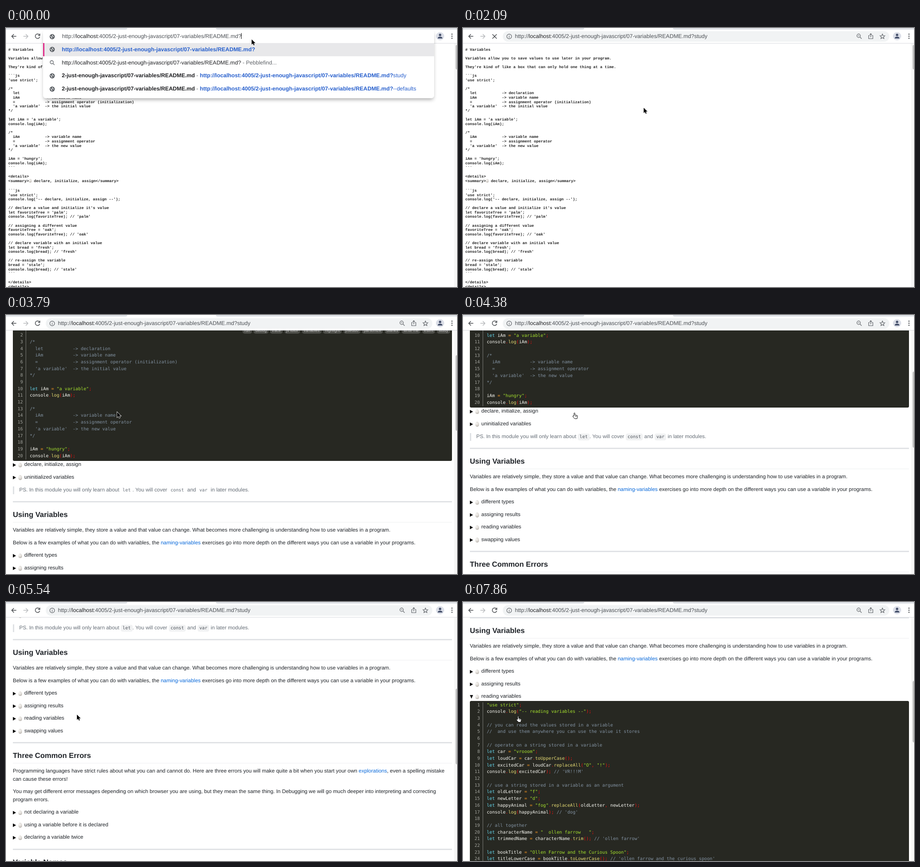
An HTML page for the animation above (8000 ms loop, 986x568 px).

```html
<!DOCTYPE html>
<html lang="en">
<head>
<meta charset="utf-8">
<title>Study page</title>
<style>
html, body { margin: 0; width: 100%; height: 100%; overflow: hidden; background: #fff; }
body { position: relative; font: 11.47px/17.5px "Liberation Sans", Arial, sans-serif; color: #1f2328; text-rendering: geometricPrecision; }
body > *, .row, .code, .code > * { position: absolute; }
pre { margin: 0; }
[hidden] { display: none !important; }

#raw { left: 5px; top: 43.5px; font: bold 8.33px/9.6px "Liberation Mono", monospace; color: #222; }
#raw div { height: 9.6px; }
#raw .tall { height: 12px; }

#doc { left: 15px; width: 960px; }
.row { left: 0; margin-top: -9px; white-space: nowrap; }
.h1 { font: bold 21.5px/28px "Liberation Sans", sans-serif; margin-top: -14px; }
.h2 { font: bold 16.1px/22px "Liberation Sans", sans-serif; margin-top: -11px; }
.hr { width: 960px; height: 3px; margin-top: -1.5px; background: #e1e3e6; }
.line { width: 960px; height: 1px; margin-top: 0; background: #eeeff1; }
.quote { padding-left: 11px; border-left: 3px solid #dfe2e5; color: #656d76; }
.quote code { font: 9.8px "DejaVu Sans Mono", monospace; padding: 2px 4px; border-radius: 4px; }
.pills code { background: #f1f2f3; color: #4a5058; }
.sum { padding-left: 25px; }
.sum::before { content: ""; position: absolute; left: 0; top: 5px; width: 7px; height: 8px; background: #111; clip-path: polygon(0 0, 100% 50%, 0 100%); }
.open::before { clip-path: polygon(0 0, 100% 0, 50% 100%); }
.egg { display: inline-block; width: .73em; height: .92em; border-radius: 50% 50% 50% 50% / 58% 58% 42% 42%; background: radial-gradient(circle at 35% 35%, #f3f1ee 12%, #d6d2cd 55%, #9c968f); vertical-align: -1px; }
.sum .egg { position: absolute; left: 11.5px; top: 3.5px; }
a { color: #0969da; }

.code { left: 0; width: 960px; border-radius: 3px; background: #272822; color: #f8f8f2; font: 9.75px/14.68px "DejaVu Sans Mono", monospace; }
.code pre { top: 3px; left: 37px; font: inherit; }
.code .nums { left: 0; width: 22px; text-align: right; color: #a0a19b; }
.code i { left: 28px; top: 3px; bottom: 3px; width: 1px; background: #7b7c77; }
.cm { color: #8292a2; } .st { color: #a6e22e; } .kw { color: #66d9ef; }
.fn { color: #e6db74; } .op { color: #fd971f; } .pu { color: #f01010; }
.tools { right: 4px; top: 6px; display: flex; gap: 3.6px; font: 8.8px/14px "Liberation Sans", sans-serif; color: #bbb; }
.tools span { padding: 0 4px; border-radius: 5px; background: #e0e0e033; white-space: nowrap; }

.plain { font-family: "Liberation Serif", serif; margin-left: -10px; }
.plain .row { font-family: inherit; }
.plain .code { background: none; color: #111; }
.plain .code span { color: inherit; }
.plain .nums, .plain i, .plain .line { display: none; }

#track { left: 981px; top: 34px; width: 5px; height: 534px; border-left: 1px solid #e6e6e6; box-sizing: border-box; background: #fafafa; }
#thumb { left: 983px; width: 7px; border-radius: 4px; background: #c1c1c1; }
#bar { left: 0; top: 0; }
#popup { left: 81px; top: 4px; width: 855px; background: #fff; border-radius: 6px; box-shadow: 0 5px 8px -2px #0005; overflow: hidden; }
#popup b { color: #202124; }
#popup .u { color: #2860cd; }
#popup b.u { font-size: 12.2px; }
.hit { position: absolute; left: 0; width: 100%; height: 28.8px; line-height: 28.8px; white-space: pre; color: #5f6368; }
.hit:first-of-type { background: #e8e8ea; box-shadow: inset 3px 0 #e0338c; }
.hit svg { position: absolute; left: 12px; top: 6.4px; }
.hit div { margin-left: 41px; }
#popup, #url { font-size: 12.1px; }
#url { top: 9px; line-height: 19px; white-space: nowrap; color: #4d5156; }
#url span { color: #202124; }
#caret { display: inline-block; width: 1px; height: 13px; background: #111; vertical-align: -2px; }
</style>
</head>
<body>
<pre id="raw"></pre>
<div id="doc"></div>
<div id="track"></div>
<div id="thumb"></div>
<svg id="bar" width="986" height="34" fill="none" stroke="#4a4d51" stroke-width="1.5">
  <g stroke="none">
    <path fill="#fff" d="M0 0h986v34H0z"/>
    <path fill="#dee1e6" d="M0 0H265Q265 3.5 261 3.5H0zM459 0H986V3.5H463Q459 3.5 459 0z"/>
    <path fill="#dadce0" d="M0 33h986v1H0z"/>
    <rect x="87" y="7" width="845" height="23" rx="11.5" fill="#f1f3f4"/>
    <circle cx="949" cy="18" r="9" fill="#dcdfe8"/>
    <path fill="#45506b" d="M949 12.6a2.6 2.6 0 0 1 0 5.2a2.6 2.6 0 0 1 0-5.2M943.8 23q0-4 5.2-4t5.2 4z"/>
    <g fill="#4a4d51"><circle cx="975" cy="13.5" r="1.3"/><circle cx="975" cy="18" r="1.3"/><circle cx="975" cy="22.5" r="1.3"/></g>
  </g>
  <path d="M22.5 18.3H12.8M17.3 13.4L12.5 18.3L17.3 23.2"/>
  <path stroke="#b9bbbe" d="M38 18.3H47.7M43.2 13.4L48 18.3L43.2 23.2"/>
  <path id="reload" d="M73 15A5 5 0 1 0 73.8 19.6M74 12.5V16.4H70"/>
  <path id="stop" d="M64.3 13.8L73.7 23.2M73.7 13.8L64.3 23.2"/>
  <g stroke-width="1.2" stroke="#5f6368">
    <circle cx="101" cy="18.5" r="5.2"/><path d="M101 17.8V21.5M101 15.4V16.6"/>
    <circle cx="865" cy="17" r="3.8"/><path d="M867.8 19.8L871.5 23.5M863.2 17H866.8"/>
    <path d="M889.3 16.5H887V23.5H896V16.5H893.7M891.5 20.5V12.5M889 14.8L891.5 12.3L894 14.8"/>
    <path d="M917 13.2L918.5 16.8L922.3 17.1L919.4 19.6L920.3 23.3L917 21.3L913.7 23.3L914.6 19.6L911.7 17.1L915.5 16.8Z"/>
  </g>
</svg>
<div id="popup"></div>
<div id="url"></div>
<svg id="arrow" width="12" height="16" overflow="visible"><path d="M0 0V11.5L2.7 9L4.5 13L6.4 12.2L4.7 8.3H8.3Z" stroke="#fff" stroke-width="1.4" paint-order="stroke"/></svg>
<svg id="hand" width="14" height="16" overflow="visible"><path d="M3.6 7.6V1.7a1.1 1.1 0 0 1 2.2 0V5.3L10 6.2Q11.6 6.6 11.4 8.2L10.4 13.4H5L1.1 8.8Q.6 7.2 2 7.1ZM7 7V9M9 7.4V9.2" fill="#fff" stroke="#111"/></svg>

<script>
const $ = id => document.getElementById(id);
const fence = '`'.repeat(3), egg = '<span class="egg"></span>';

const rawText = `# Variables

Variables allow you to save values to use later in your program.

They're kind of like a box that can only hold one thing at a time.

${fence}js
'use strict';

/*
  let           -> declaration
  iAm           -> variable name
  =             -> assignment operator (initialization)
  'a variable'  -> the initial value
*/

let iAm = 'a variable';
console.log(iAm);

/*
  iAm           -> variable name
  =             -> assignment operator
  'a variable'  -> the new value
*/

iAm = 'hungry';
console.log(iAm);
${fence}

<details>
<summary>@ declare, initialize, assign</summary>

${fence}js
'use strict';
console.log('-- declare, initialize, assign --');

// declare a value and initialize it's value
let favoriteTree = 'palm';
console.log(favoriteTree); // 'palm'

// assigning a different value
favoriteTree = 'oak';
console.log(favoriteTree); // 'oak'

// declare variable with an initial value
let bread = 'fresh';
console.log(bread); // 'fresh'

// re-assign the variable
bread = 'stale';
console.log(bread); // 'stale'
${fence}

</details>
<details>`;

const introCode = `"use strict";

/*
  let           -> declaration
  iAm           -> variable name
  =             -> assignment operator (initialization)
  'a variable'  -> the initial value
*/

let iAm = "a variable";
console.log(iAm);

/*
  iAm           -> variable name
  =             -> assignment operator
  'a variable'  -> the new value
*/

iAm = "hungry";
console.log(iAm);`;

const readingCode = `"use strict";
console.log("-- reading variables --");

// you can read the values stored in a variable
//  and use them anywhere you can use the value it stores

// operate on a string stored in a variable
let car = "vrooom";
let loudCar = car.toUpperCase();
let excitedCar = loudCar.replaceAll("O", "!");
console.log(excitedCar); // 'VR!!!M'

// use a string stored in a variable as an argument
let oldLetter = "f";
let newLetter = "d";
let happyAnimal = "fog".replaceAll(oldLetter, newLetter);
console.log(happyAnimal); // 'dog'

// all together
let characterName = "  ollen farrow   ";
let trimmedName = characterName.trim(); // 'ollen farrow'

let bookTitle = "Ollen Farrow and the Curious Spoon";
let titleLowerCase = bookTitle.toLowerCase(); // 'ollen farrow and the curious spoon'`;

const token = /(\/\*[\s\S]*?\*\/|\/\/.*)|("[^"]*")|\b(let)\b|(\w+(?=\())|(=)|([().,;]+)/g;
const kinds = ['cm', 'st', 'kw', 'fn', 'op', 'pu'];
const paint = code => code.replace(token, (text, ...groups) =>
  `<span class="${kinds[groups.findIndex(g => g)]}">${text}</span>`);

function codeBlock(y, code, id, extra = '') {
  const n = code.split('\n').length;
  const nums = Array.from({ length: n }, (_, i) => i + 1).join('\n');
  return `<div class="code" id="${id}" style="top:${y}px;height:${n * 14.68 + 6}px">
    <pre class="nums">${nums}</pre><i></i><pre>${paint(code)}</pre>${extra}</div>`;
}
const row = (y, html, cls = '') => `<div class="row ${cls}" style="top:${y}px">${html}</div>`;
const section = (y, title) => row(y - 28.5, '', 'hr') + row(y, title, 'h2') + row(y + 16, '', 'line');
const summaries = (y, ...names) => names.map((name, i) => row(y + i * 27.5, egg + name, 'sum')).join('');
const tools = ['run', 'debug', 'trace', 'js tutor', 'variables', 'highlight', 'pseudo', 'parsonize', 'blanks', 'write me', 'eslint', 'study'];

$('raw').innerHTML = rawText.replace(/</g, '&lt;').split('\n').map(line =>
  `<div${line.includes('@') ? ' class="tall"' : ''}>${line.replace('@', egg)}</div>`).join('');

$('doc').innerHTML =
  row(97, 'Variables', 'h1') + row(119, '', 'line') +
  row(139, 'Variables allow you to save values to use later in your program.') +
  row(166.5, "They're kind of like a box that can only hold one thing at a time.") +
  codeBlock(185.5, introCode, 'intro',
    `<div class="tools" id="tools">${tools.map(t => `<span>${t}</span>`).join('')}</div>`) +
  summaries(494, 'declare, initialize, assign', 'uninitialized variables') +
  row(549.5, 'PS. In this module you will only learn about <code>let</code>. You will cover <code>const</code> and <code>var</code> in later modules.', 'quote') +
  section(603, 'Using Variables') +
  row(638, 'Variables are relatively simple, they store a value and that value can change. What becomes more challenging is understanding how to use variables in a program.') +
  row(665.5, 'Below is a few examples of what you can do with variables, the <a>naming-variables</a> exercises go into more depth on the different ways you can use a variable in your programs.') +
  summaries(693, 'different types', 'assigning results', 'reading variables', 'swapping values') +
  section(829, 'Three Common Errors') +
  row(864, 'Programming languages have strict rules about what you can and cannot do. Here are three errors you will make quite a bit when you start your own <a>explorations</a>, even a spelling mistake<br>can cause these errors!') +
  row(909, 'You may get different error messages depending on which browser you are using, but they mean the same thing. In Debugging we will go much deeper into interpreting and correcting<br>program errors.') +
  summaries(954, 'not declaring a variable', 'using a variable before it is declared', 'declaring a variable twice') +
  section(1062.5, 'Variable Names') +
  codeBlock(756.5, readingCode, 'reading');
const readingRow = [...document.querySelectorAll('.sum')].find(el => el.textContent === 'reading variables');

// Address bar and suggestions
const path = '2-just-enough-javascript/07-variables/README.md';
const host = 'http://localhost:4005/';
const icon = shape => `<svg width="16" height="16" fill="none" stroke="#5f6368" stroke-width="1.3">${shape}</svg>`;
const globe = icon('<circle cx="8" cy="8" r="5" fill="#5f6368"/><path stroke="#fff" d="M4 7L6.5 8.5L7.5 12M8.5 4V6L11 8.5"/>');
const lens = icon('<circle cx="7" cy="7" r="3.5"/><path d="M9.5 9.5L13 13"/>');
const hit = (i, mark, html) => `<div class="hit" style="top:${28.8 * (i + 1)}px">${mark}<div>${html}</div></div>`;
const saved = (i, query) => hit(i, globe, `<b>${path}</b> - <b class="u">${host + path}?</b><span class="u">${query}</span>`);

let shown;
function showAddress(query, focused) {
  const key = query + focused;
  if (key === shown) return;
  shown = key;
  const full = `${host + path}?${query}`;
  $('popup').hidden = !focused;
  $('url').style.left = (focused ? 122.5 : 113.5) + 'px';
  $('url').innerHTML = `http://<span>localhost</span>:4005/${path}?${query}${focused ? '<i id="caret"></i>' : ''}`;
  $('popup').style.height = (query ? 92.5 : 150) + 'px';
  $('popup').innerHTML = hit(0, globe, `<b class="u">${full}</b>`) +
    hit(1, lens, `<span style="color:#202124">${full}</span> - Pebblefind...`) +
    (query ? '' : saved(2, 'study') + saved(3, '--defaults')) +
    `<span style="position:absolute;left:12px;top:6.5px;line-height:0">${globe}</span>`;
}

// time, scroll, pointer, x, y
const steps = [
  [0, 0, 'arrow', 537, 25], [2090, 0, 'arrow', 395, 175], [2420, 0, 'arrow', 243, 213],
  [3310, 45, 'arrow', 243, 213], [3580, 70, 'arrow', 243, 213], [3790, 165, 'arrow', 243, 213],
  [3930, 205, 'arrow', 243, 213], [4080, 240, 'arrow', 243, 213], [4230, 265, 'arrow', 243, 213],
  [4380, 282, 'hand', 239, 214], [4530, 288, 'hand', 239, 214], [4710, 312, 'arrow', 243, 213],
  [4880, 365, 'arrow', 243, 213], [5040, 425, 'arrow', 243, 213], [5210, 466, 'arrow', 243, 213],
  [5370, 486, 'arrow', 205, 232], [5540, 492, 'arrow', 155, 247], [5910, 492, 'arrow', 135, 250],
  [6040, 492, 'hand', 116, 250], [6490, 492, 'hand', 116, 251], [6640, 492, 'hand', 116, 250],
  [7680, 516, 'hand', 116, 250], [7860, 540, 'hand', 116, 250]
];
const typing = [[0, ''], [300, 's'], [450, 'st'], [600, 'stud'], [750, 'study']];
const current = (list, t) => list.findLast(step => step[0] <= t);

function draw(now) {
  const t = now % 8000;
  const [, scroll, pointer, x, y] = current(steps, t);
  const open = t >= 7230, styled = t >= 3580;

  showAddress(current(typing, t)[1], t < 1040);
  $('reload').style.display = t < 1040 || styled ? '' : 'none';
  $('stop').style.display = t >= 1040 && !styled ? '' : 'none';

  $('raw').hidden = t >= 2710;
  $('doc').hidden = t < 3310;
  $('doc').className = (styled ? '' : 'plain ') + (t >= 3930 ? 'pills' : '');
  $('doc').style.top = -scroll + 'px';
  $('tools').hidden = !styled || t >= 4380;
  $('reading').hidden = !open;
  readingRow.classList.toggle('open', open);

  const height = t < 2710 ? 5280 : open ? 2112 : 1715;
  $('thumb').style.top = 36.5 + (styled ? scroll * 534 / height : 0) + 'px';
  $('thumb').style.height = 534 * 534 / height + 'px';
  $('thumb').hidden = t >= 2710 && !styled;

  for (const id of ['arrow', 'hand']) {
    const style = $(id).style;
    style.display = id === pointer ? '' : 'none';
    style.left = x + 'px';
    style.top = y + 'px';
  }
  requestAnimationFrame(draw);
}
requestAnimationFrame(draw);
</script>
</body>
</html>
```
